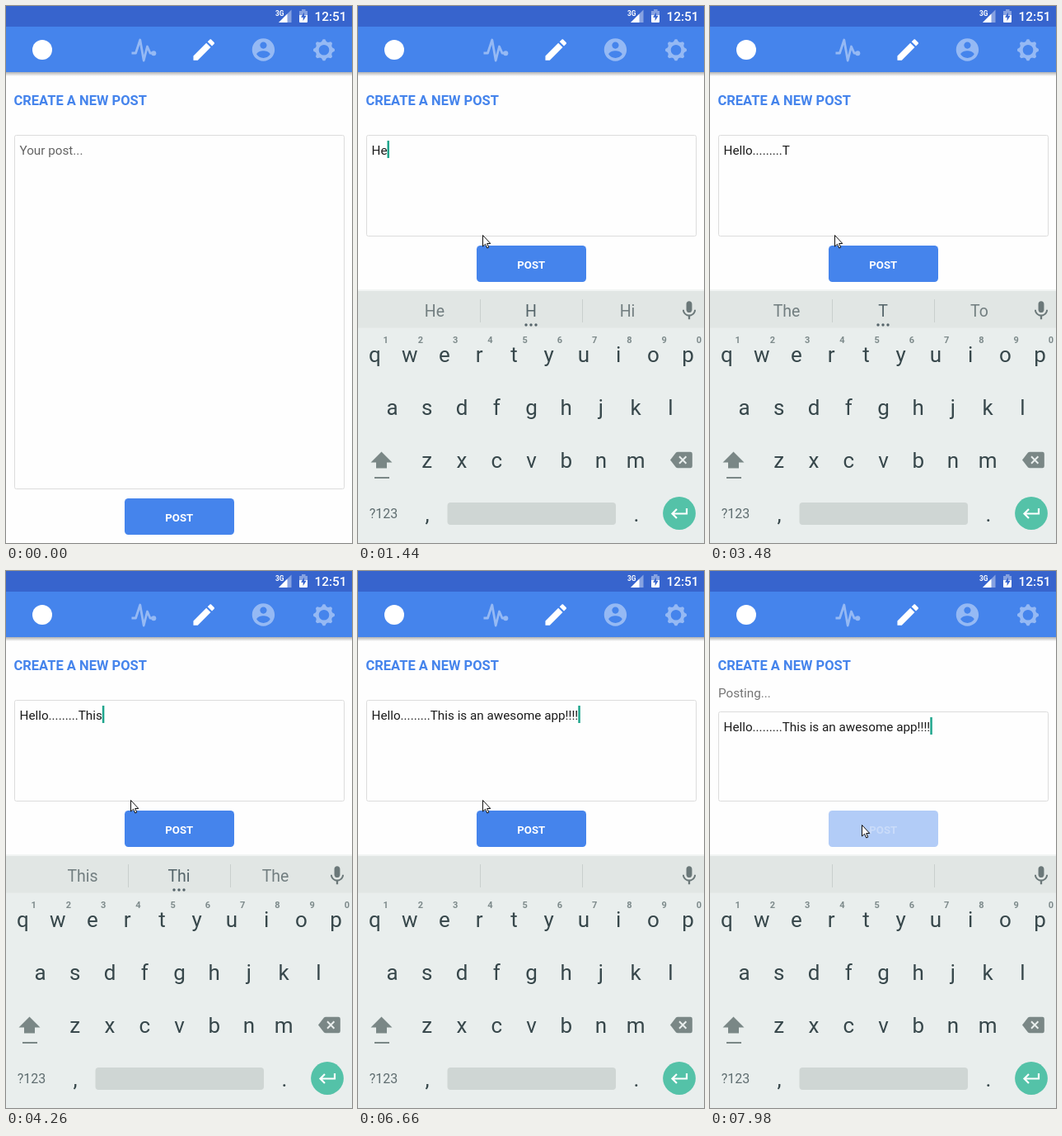
Write an HTML page that moves like this. It is 420 px wide and 650 px high and loops after 8000 ms.

```html
<!DOCTYPE html>
<html lang="en">
<head>
<meta charset="utf-8">
<title>Create a new post</title>
<style>
html, body { margin: 0; width: 100%; height: 100%; overflow: hidden; background: #fefefe; }
svg { display: block; width: 420px; height: 650px; }
text { font-family: Roboto, "Open Sans", sans-serif; white-space: pre; }
.mid { text-anchor: middle; }
.key { font-size: 26px; fill: #37474b; }
.digit { font-size: 11px; font-weight: 700; fill: #7d8a8b; }
.word { font-size: 19.5px; fill: #727e80; }
.icon { fill: #7a8786; }
.dim { opacity: .43; }
</style>
</head>
<body>
<svg viewBox="0 0 420 650" xmlns="http://www.w3.org/2000/svg">
  <defs>
    <linearGradient id="shade" x2="0" y2="1">
      <stop stop-color="#000" stop-opacity=".3"/>
      <stop offset="1" stop-color="#000" stop-opacity="0"/>
    </linearGradient>
  </defs>
  <rect width="420" height="650" fill="#fefefe"/>

  <!-- status bar -->
  <rect y="80" width="420" height="5" fill="url(#shade)"/>
  <rect y="25" width="420" height="55" fill="#4584ec"/>
  <rect width="420" height="25" fill="#3764cd"/>
  <g fill="#fff">
    <text x="327" y="12" font-size="8.3" font-weight="700">3G</text>
    <path d="M331 20H346.5V4.5Z" opacity=".4"/>
    <path d="M331 20H341.5V9.5Z"/>
    <path d="M359 4h4.5v2h2.5v5h-10v-5h3Z" opacity=".4"/>
    <path d="M356 11h10v8q0 1-1 1h-8q-1 0-1-1Z"/>
    <path d="M362 7.500l-4 6.200h2.600v4.300l4-6.300h-2.600Z" fill="#3764cd"/>
    <text x="374.500" y="18" font-size="15.4" font-weight="500">12:51</text>
  </g>

  <!-- header -->
  <g fill="#fff">
    <circle cx="44" cy="53" r="12"/>
    <g class="dim">
      <path d="M152.500 57H157.500L162.800 41 167.200 66 171.500 49 175 57H178" fill="none" stroke="#fff" stroke-width="2.800" stroke-linejoin="round"/>
      <circle cx="179.300" cy="57.300" r="3"/>
    </g>
    <path transform="translate(223.200 36) scale(1.420)" d="M3 17.250V21h3.750L17.810 9.940l-3.750-3.750L3 17.250zM20.710 7.040c.39-.39.39-1.020 0-1.410l-2.340-2.340c-.39-.39-1.020-.39-1.410 0l-1.830 1.830 3.750 3.750 1.830-1.830z"/>
    <path class="dim" transform="translate(296 36.600) scale(1.370)" d="M12 2C6.480 2 2 6.480 2 12s4.480 10 10 10 10-4.480 10-10S17.520 2 12 2zm0 3c1.660 0 3 1.340 3 3s-1.340 3-3 3-3-1.340-3-3 1.340-3 3-3zm0 14.200c-2.500 0-4.710-1.280-6-3.220.03-1.990 4-3.080 6-3.080 1.990 0 5.970 1.090 6 3.080-1.290 1.940-3.500 3.220-6 3.220z"/>
    <path id="gear" class="dim" fill-rule="evenodd"/>
  </g>

  <!-- form -->
  <text x="9.500" y="120" font-size="16.5" font-weight="700" fill="#4584ec">CREATE A NEW POST</text>
  <text id="note" x="10" y="153" font-size="15.25" fill="#747474">Posting...</text>
  <rect id="box" x="10.500" width="400" rx="2" fill="#fefefe" stroke="#dcdcdc"/>
  <text id="post" x="16.500" font-size="15.25"></text>
  <rect id="caret" width="2.500" height="21" fill="#1ea58c"/>
  <g id="button">
    <rect id="plate" x="144" width="133" height="44" rx="4.500" fill="#4584ec"/>
    <text id="label" class="mid" x="210.300" y="27.500" font-size="13.2" font-weight="700" fill="#fff">POST</text>
  </g>

  <!-- keyboard -->
  <g id="keyboard">
    <rect y="343" width="420" height="2" fill="#f1f4f3"/>
    <rect y="345" width="420" height="306" fill="#e9eeed"/>
    <rect y="345" width="420" height="44.500" fill="#e1e6e4"/>
    <path d="M148.500 355V383M272.500 355V383" stroke="#c9cfcd"/>
    <g id="words"></g>
    <g id="dots" fill="#55646a">
      <circle cx="204" cy="386" r="1.700"/><circle cx="210" cy="386" r="1.700"/><circle cx="216" cy="386" r="1.700"/>
    </g>
    <path transform="translate(388.200 355) scale(1.150)" fill="#6b7879" d="M12 14c1.660 0 3-1.340 3-3V5c0-1.660-1.340-3-3-3S9 3.340 9 5v6c0 1.660 1.340 3 3 3zm5.300-3c0 3-2.540 5.100-5.300 5.100S6.700 14 6.700 11H5c0 3.410 2.720 6.230 6 6.720V21h2v-3.280c3.280-.48 6-3.300 6-6.720h-1.700z"/>
    <g id="keys"></g>
    <path class="icon" d="M28.500 539.500L41.500 552.500H35V559.500H22V552.500H15.500Z"/>
    <rect class="icon" x="20" y="570" width="18" height="2"/>
    <path class="icon" d="M379 549.500L386 540.500Q387 539.700 388 539.700H403.500Q405.800 539.700 405.800 542V557Q405.800 559.300 403.500 559.300H388Q387 559.300 386 558.500Z"/>
    <path d="M390 545.300L398.400 553.700M398.400 545.300L390 553.700" stroke="#e9eeed" stroke-width="2"/>
    <text class="mid" x="31" y="619.500" font-size="16" fill="#5f6d70">?123</text>
    <rect x="108.500" y="601" width="204.500" height="27" rx="4" fill="#cfd6d4"/>
    <circle cx="390" cy="614" r="19.900" fill="#54c2a8"/>
    <path d="M399 608V614.500H382M387 609L381.500 614.500 387 620" fill="none" stroke="#fff" stroke-width="2.200"/>
  </g>

  <path id="pointer" d="M.5 .5V14L3.600 11.200 5.800 16 7.800 15.100 5.700 10.500H9.800Z" fill="#fff" stroke="#111"/>
</svg>

<script>
const LOOP = 8000, FOCUS = 420, BLINK = 300;
const $ = id => document.getElementById(id);

function addText(parent, cls, x, y, str) {
  const el = document.createElementNS("http://www.w3.org/2000/svg", "text");
  el.setAttribute("class", cls + " mid");
  el.setAttribute("x", x);
  el.setAttribute("y", y);
  el.textContent = str;
  return $(parent).appendChild(el);
}

function set(id, attrs) {
  for (const k in attrs) $(id).setAttribute(k, attrs[k]);
}

// Rows are centred on cx.
function addRow(str, cx, y, cls = "key") {
  [...str].forEach((c, i) =>
    addText("keys", cls, cx + 42.23 * (i - (str.length - 1) / 2), y, c));
}
addRow("qwertyuiop", 210.5, 431);
addRow("1234567890", 223.8, 407.5, "digit");
addRow("asdfghjkl", 210.5, 495);
addRow("zxcvbnm", 210.5, 559);
addText("keys", "key", 84, 624, ",");
addText("keys", "key", 338, 624, ".");

const words = [93, 210, 327].map(x => addText("words", "word", x, 376, ""));
words[1].style.fill = "#55656a";

// Eight teeth, the first one pointing up.
const rim = Array.from({ length: 32 }, (_, i) => {
  const a = (i - .5) * Math.PI / 16, r = i % 4 < 2 ? 13 : 10.5;
  return (386 + r * Math.sin(a)).toFixed(2) + " " + (53.3 - r * Math.cos(a)).toFixed(2);
});
set("gear", { d: "M" + rim.join("L") + "ZM379.7 53.3a6.3 6.3 0 1 0 12.6 0a6.3 6.3 0 1 0-12.6 0Z" });

// [time, characters typed]
const typed = [
  [1260, "H"], [1380, "e"], [1500, "l"], [1620, "l"], [1800, "o"],
  [1980, ".."], [2160, "."], [2280, "."], [2340, "."], [2400, "."],
  [2520, "."], [2580, "."], [2820, "."],
  [3060, "T"], [3540, "h"], [4020, "i"], [4260, "s"],
  [4380, " "], [4440, "i"], [4500, "s"], [4620, " "], [4680, "a"], [4740, "n"],
  [4860, " "], [4920, "a"], [4980, "w"], [5040, "e"], [5160, "s"], [5280, "om"], [5340, "e"],
  [5580, " "], [5700, "a"], [5820, "p"], [5940, "p"],
  [6240, "!"], [6420, "!"], [6540, "!"], [6660, "!"]
];

// [time, left|middle|right]; * makes the middle word bold
const hints = [
  [0, ""], [1320, "He|H|Hi"], [1500, "Hey|He|Her"], [1680, "Hello|Hel|Help"],
  [1980, "Hell|Hello|Help"], [2160, ""],
  [3120, "The|T|To"], [3600, "The|Th|TH"], [4080, "This|Thi|The"],
  [4380, "This|This|These"], [4560, "is|is|it"], [4740, "and|an|any"],
  [4860, ""], [4980, "a|a|at"], [5160, "a we|*awe|see"],
  [5460, "awesome|*awesome|awe"], [5580, ""], [5760, "a|a|an"],
  [6000, "apps|app|approach"], [6300, ""]
];

// [time, x, y]
const path = [
  [60, 118, 295], [120, 130, 289], [180, 142, 283], [240, 151, 277],
  [7620, 161, 287], [7680, 173, 298], [7740, 184, 307]
];

// [time, offset, opacity]
const rise = [[420, 20, .4], [480, 5, .95], [540, 1, 1], [600, 0, 1]];
const fade = [[0, 1], [7860, .7], [7920, .41]];

const last = (table, t) => table.filter(s => s[0] <= t).pop();

function draw(t) {
  const text = typed.filter(s => s[0] <= t).map(s => s[1]).join("");
  const open = t >= 480, posting = t >= 7980;
  const top = posting ? 170.5 : 156.5;

  set("note", { visibility: posting ? "visible" : "hidden" });
  set("box", { y: top, height: (open ? 278.5 : 584.5) - top });
  set("post", { y: top + 23.5, fill: text ? "#1b1b1b" : "#636363" });
  $("post").textContent = text || "Your post...";

  const since = t - (last(typed, t) || [FOCUS])[0];
  const lit = since >= 0 && Math.floor(since / BLINK) % 2 === 0;
  const end = text ? $("post").getComputedTextLength() : 0;
  set("caret", { x: 16.5 + end, y: top + 6.5, visibility: lit ? "visible" : "hidden" });

  const alpha = last(fade, t)[1];
  set("button", { transform: `translate(0 ${open ? 290 : 596})` });
  set("plate", { opacity: alpha });
  set("label", { opacity: alpha < .5 ? .3 : alpha });

  const lift = last(rise, t);
  set("keyboard", lift
    ? { visibility: "visible", opacity: lift[2], transform: `translate(0 ${lift[1]})` }
    : { visibility: "hidden" });

  const hint = last(hints, t)[1];
  const parts = hint.replace("*", "").split("|");
  words.forEach((w, i) => { w.textContent = parts[i] || ""; });
  words[1].style.fontWeight = hint.includes("*") ? 700 : 400;
  $("dots").style.display = hint ? "" : "none";

  const at = last(path, t);
  set("pointer", at
    ? { visibility: "visible", transform: `translate(${at[1]} ${at[2]})` }
    : { visibility: "hidden" });
}

const start = performance.now();
function tick() {
  draw((performance.now() - start) % LOOP);
  requestAnimationFrame(tick);
}
tick();
</script>
</body>
</html>
```
